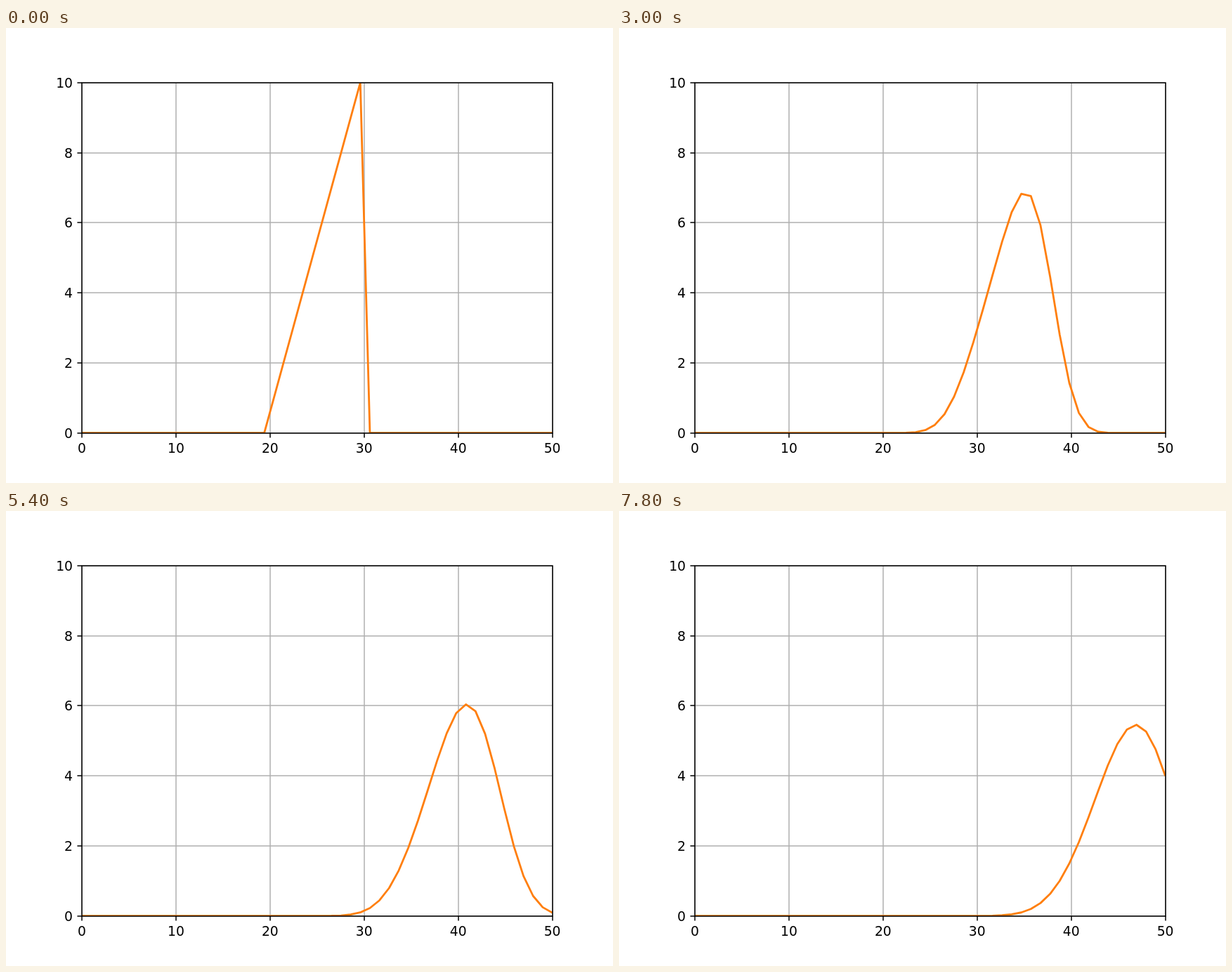
Recreate the animation shown at these times as an HTML page. Size 864 by 648 pixels, loop 8000 ms.

```html
<!DOCTYPE html>
<html lang="en">
<head>
<meta charset="utf-8">
<title>Advected pulse</title>
<style>
  html, body { margin: 0; width: 100%; height: 100%; overflow: hidden; background: #fff; }
  svg { display: block; width: 100vw; height: 100vh; }
  text { font: 18.75px "DejaVu Sans", sans-serif; fill: #000; }
  path { fill: none; stroke-width: 1.5; }
  #grid { stroke: #b0b0b0; }
  #ticks, #frame { stroke: #000; }
  #curve { stroke: #ff7f0e; stroke-width: 2.8125; stroke-linejoin: round; }
</style>
</head>
<body>
<svg viewBox="0 0 864 648">
  <clipPath id="area"><rect x="108" y="78" width="670" height="499"/></clipPath>
  <path id="grid"/>
  <path id="curve" clip-path="url(#area)"/>
  <path id="ticks"/>
  <path id="frame" d="M108 78H778V577H108Z"/>
  <g id="labels"></g>
</svg>
<script>
const STEP_MS = 200, STEPS = 40, CELLS = 50, COURANT = 0.5;
const TICK = 6.5625;
const px = x => 108 + x * 13.392;
const py = y => 576.72 - y * 49.896;
const byId = id => document.getElementById(id);

function addLabel(value, x, y, anchor) {
  const label = document.createElementNS("http://www.w3.org/2000/svg", "text");
  label.textContent = value;
  label.setAttribute("x", x);
  label.setAttribute("y", y);
  label.setAttribute("text-anchor", anchor);
  byId("labels").append(label);
}

function drawAxes() {
  let grid = "", ticks = "";
  for (let i = 0; i <= 5; i++) {
    const x = Math.round(px(i * 10)), y = Math.round(py(i * 2));
    grid += `M${x} 78V577M108 ${y}H778`;
    ticks += `M${x} 577v${TICK}M108 ${y}h${-TICK}`;
    addLabel(i * 10, px(i * 10), 605, "middle");
    addLabel(i * 2, 95, y + 7, "end");
  }
  byId("grid").setAttribute("d", grid);
  byId("ticks").setAttribute("d", ticks);
}

// Upwind scheme for a ramp pulse drifting to the right.
const advance = u => u.map((v, i) => i ? v - COURANT * (v - u[i - 1]) : v);
const toPath = u => "M" + u.map((v, i) =>
  `${px(i * 50 / (CELLS - 1)).toFixed(2)} ${py(v).toFixed(2)}`).join("L");

let wave = Array.from({ length: CELLS }, (_, i) => i > 19 && i < 30 ? i - 19 : 0);
const curves = [];
for (let n = 0; n < STEPS; n++) {
  curves.push(toPath(wave));
  wave = advance(wave);
}

const start = performance.now();
let shown = -1;
function render() {
  const elapsed = Math.max(0, performance.now() - start);
  const step = Math.floor(elapsed / STEP_MS) % STEPS;
  if (step !== shown) byId("curve").setAttribute("d", curves[shown = step]);
  requestAnimationFrame(render);
}

drawAxes();
render();
</script>
</body>
</html>
```
